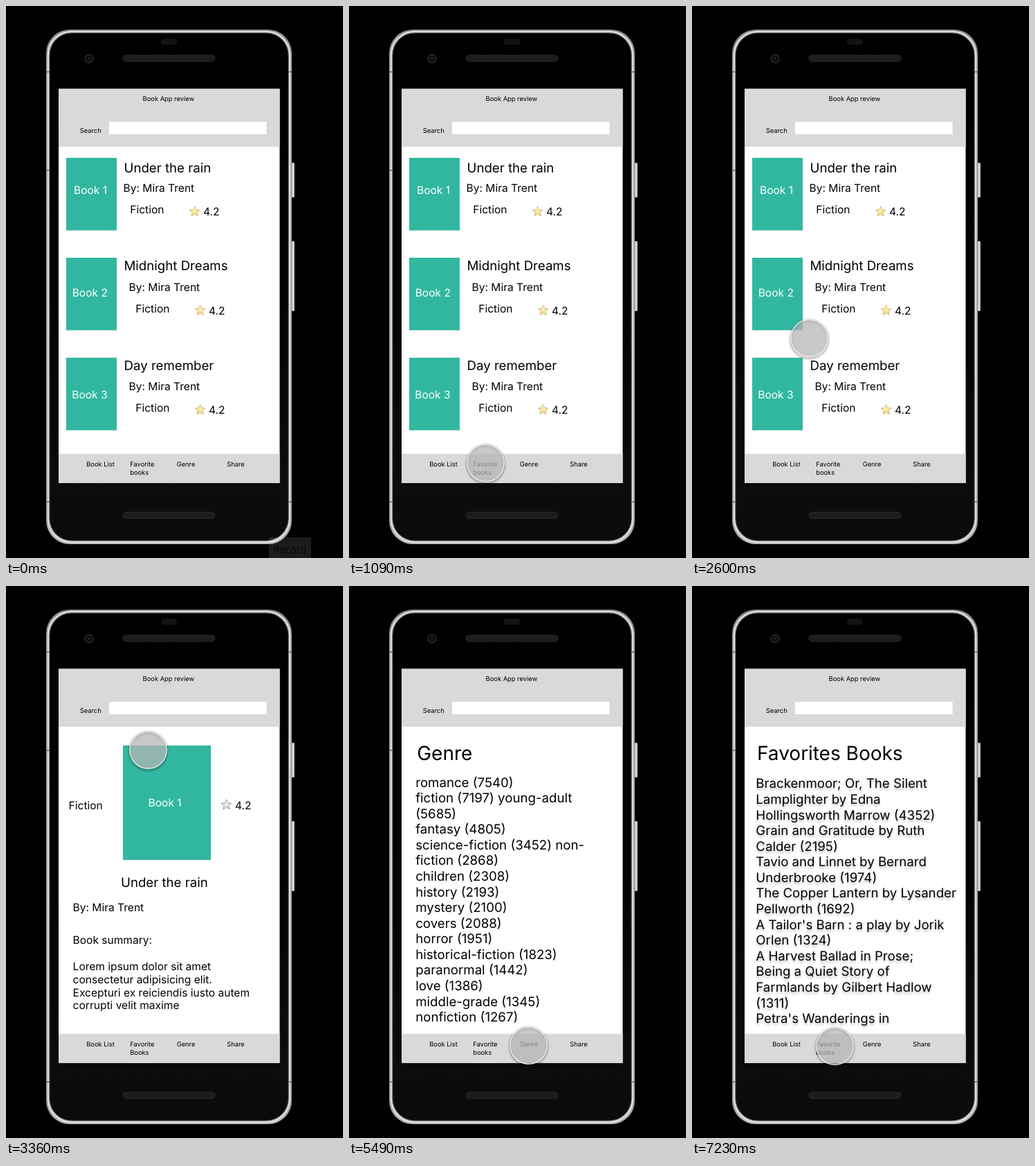
These frames come from a looping animation (487x796 px, 8000 ms). An HTML page:

```html
<!DOCTYPE html>
<html lang="en">
<head>
<meta charset="utf-8">
<title>Book app prototype</title>
<style>
  html, body { margin: 0; width: 100%; height: 100%; overflow: hidden; background: #000; }
  svg { display: block; width: 100%; height: 100%; }
  text {
    font-family: Inter, sans-serif;
    font-variation-settings: "opsz" 14;
    text-rendering: geometricPrecision;
    white-space: pre;
  }
  .tip { font-family: "Open Sans", sans-serif; }
  .soft { filter: drop-shadow(0 3.1px 1.6px rgba(0, 0, 0, .25)); }
</style>
</head>
<body>
<svg id="stage" viewBox="0 0 487 796" xmlns="http://www.w3.org/2000/svg">
  <defs>
    <linearGradient id="rim" x1="0" y1="0" x2="0" y2="1">
      <stop offset="0" stop-color="#8c8c8c"/>
      <stop offset=".06" stop-color="#9a9a9a"/>
      <stop offset=".95" stop-color="#9a9a9a"/>
      <stop offset="1" stop-color="#b8b8b8"/>
    </linearGradient>
    <linearGradient id="body" x1="0" y1="0" x2="0" y2="1">
      <stop offset="0" stop-color="#000"/>
      <stop offset=".5" stop-color="#030303"/>
      <stop offset=".9" stop-color="#0c0c0c"/>
      <stop offset="1" stop-color="#0b0b0b"/>
    </linearGradient>
    <linearGradient id="gold" x1="0" y1="0" x2="0" y2="1">
      <stop offset="0" stop-color="#fffbe0"/>
      <stop offset="1" stop-color="#f3d877"/>
    </linearGradient>
    <linearGradient id="silver" x1="0" y1="0" x2="0" y2="1">
      <stop offset="0" stop-color="#fff"/>
      <stop offset="1" stop-color="#d4d4d4"/>
    </linearGradient>
    <filter id="blur" x="-30%" y="-30%" width="160%" height="160%">
      <feGaussianBlur stdDeviation="1.6"/>
    </filter>
  </defs>
</svg>
<script>
const stage = document.getElementById('stage');
const TEAL = '#31b7a0', GREY = '#d9d9d9';
const TINY = 9.33, MID = 15.55, BIG = 18.66, HEAD = 28;
const LEADING = 1.21;

function add(parent, tag, attrs = {}) {
  const el = document.createElementNS('http://www.w3.org/2000/svg', tag);
  for (const key in attrs) el.setAttribute(key, attrs[key]);
  parent.appendChild(el);
  return el;
}
const group = (attrs) => add(stage, 'g', attrs);
const box = (parent, x, y, width, height, fill, more) =>
  add(parent, 'rect', { x, y, width, height, fill, ...more });

function label(parent, str, x, y, size, fill = '#000', more) {
  const el = add(parent, 'text', { x, y, 'font-size': size, fill, ...more });
  el.textContent = str;
  return el;
}
function lines(parent, rows, x, y, size) {
  rows.forEach((row, i) => label(parent, row, x, y + i * size * LEADING, size));
}
function star(parent, x, y, fill, stroke) {
  const pts = [];
  for (let i = 0; i < 10; i++) {
    const r = i % 2 ? 3.5 : 7.8, a = i * Math.PI / 5;
    pts.push((x + r * Math.sin(a)).toFixed(2) + ',' + (y + .6 - r * Math.cos(a)).toFixed(2));
  }
  add(parent, 'polygon', {
    points: pts.join(' '), fill: `url(#${fill})`, stroke,
    'stroke-width': .9, 'stroke-linejoin': 'round'
  });
}

function drawPhone() {
  const g = group();
  for (const [y, h] of [[226, 50], [339, 101]]) {
    box(g, 411, y, 6, h, '#a8a8a8', { rx: 1 });
    box(g, 413.5, y + 1, 2.5, h - 2, '#d8d8d8');
  }
  box(g, 58, 34, 355, 742, 'url(#rim)', { rx: 34 });
  box(g, 61, 37, 349, 736, 'none', { rx: 33, stroke: '#dedede', 'stroke-width': 2.4 });
  box(g, 63, 39, 345, 732, 'url(#body)', { rx: 32, stroke: '#4a4a4a', 'stroke-width': 1 });
  for (const [x, y] of [[58, 94], [408, 94], [58, 236], [58, 714], [408, 714]]) {
    box(g, x, y, 5, 2, '#777');
  }
  for (const y of [71, 730]) {
    box(g, 169, y, 133, 9, '#1d1d1d', { rx: 4.5, stroke: '#2b2b2b', 'stroke-width': 1 });
  }
  box(g, 224, 47, 23, 9, '#131313', { rx: 4 });
  add(g, 'circle', { cx: 120, cy: 76, r: 7, fill: '#1d1d1d' });
  add(g, 'circle', { cx: 120, cy: 76, r: 4, fill: '#0a0a0a' });
  add(g, 'circle', { cx: 120, cy: 75.5, r: 1.6, fill: '#2c2c2c' });
}

function drawFrame() {
  const g = group();
  box(g, 76, 119.5, 319.5, 568.5, '#fff');
  box(g, 76, 119.5, 319.5, 83.5, GREY);
  box(g, 149, 167, 227.5, 18, '#fff');
  box(g, 76, 645.8, 319.5, 42.2, GREY);
  label(g, 'Book App review', 197.6, 137.4, TINY);
  label(g, 'Search', 106.7, 183, TINY);
  label(g, 'Book List', 116.2, 664.2, TINY);
  label(g, 'Favorite', 179.2, 664.2, TINY);
  label(g, 'Genre', 246.7, 664.2, TINY);
  label(g, 'Share', 319.2, 664.2, TINY);
  return label(g, 'books', 179.2, 675.5, TINY);
}

function drawList() {
  const g = group();
  // title, cover top, cover label x/y, title y, author y, genre y, detail x shift
  const rows = [
    ['Under the rain', 219, 98, 270.8, 240.4, 268.4, 299.4, 0],
    ['Midnight Dreams', 363, 95.7, 419.4, 381.3, 411, 442, 8],
    ['Day remember', 507.2, 95.3, 566.4, 525.3, 554, 585.2, 8]
  ];
  rows.forEach(([title, top, bx, by, ty, ay, gy, dx], i) => {
    box(g, 87, top, 73, 104.6, TEAL);
    label(g, 'Book ' + (i + 1), bx, by, MID, '#fff');
    label(g, title, 170.5, ty, BIG);
    label(g, 'By: Mira Trent', 169.6 + dx, ay, MID);
    label(g, 'Fiction', 179.3 + dx, gy, MID);
    star(g, 272.6 + dx, gy - 3.4, 'gold', '#cdb067');
    label(g, '4.2', 285 + dx, gy + 3, MID);
  });
  return g;
}

function drawDetail() {
  const g = group();
  box(g, 169, 230, 127, 165, TEAL);
  label(g, 'Book 1', 205.6, 318.3, MID, '#fff');
  label(g, 'Fiction', 90.6, 322, MID);
  star(g, 318.5, 315, 'silver', '#8f8f8f');
  label(g, '4.2', 331, 322.4, MID);
  label(g, 'Under the rain', 166, 433.6, BIG);
  label(g, 'By: Mira Trent', 96.6, 469.2, MID);
  lines(g, ['Book summary:', '', 'Lorem ipsum dolor sit amet', 'consectetur adipisicing elit.',
    'Excepturi ex reiciendis iusto autem', 'corrupti velit maxime'], 96.6, 516.4, MID);
  return g;
}

function drawGenre() {
  const g = group();
  label(g, 'Genre', 98.2, 251, HEAD);
  lines(g, ['romance (7540)', 'fiction (7197) young-adult', '(5685)', 'fantasy (4805)',
    'science-fiction (3452) non-', 'fiction (2868)', 'children (2308)', 'history (2193)',
    'mystery (2100)', 'covers (2088)', 'horror (1951)', 'historical-fiction (1823)',
    'paranormal (1442)', 'love (1386)', 'middle-grade (1345)', 'nonfiction (1267)'],
    96.2, 289.5, BIG);
  return g;
}

function drawFavorites() {
  const g = group();
  label(g, 'Favorites Books', 94, 251, HEAD);
  const list = add(g, 'g', { class: 'soft' });
  lines(list, ['Brackenmoor; Or, The Silent', 'Lamplighter by Edna',
    'Hollingsworth Marrow (4352)', 'Grain and Gratitude by Ruth', 'Calder (2195)',
    'Tavio and Linnet by Bernard', 'Underbrooke (1974)', 'The Copper Lantern by Lysander',
    'Pellworth (1692)', "A Tailor's Barn : a play by Jorik", 'Orlen (1324)',
    'A Harvest Ballad in Prose;', 'Being a Quiet Story of', 'Farmlands by Gilbert Hadlow',
    '(1311)', "Petra's Wanderings in"], 92.3, 291.4, BIG);
  return g;
}

function drawTip() {
  const g = group();
  box(g, 380, 766, 61, 30, '#fff', { opacity: .11 });
  label(g, 'Record', 386.5, 789, 14.6, '#000', { class: 'tip', opacity: .8 });
  return g;
}

function drawCursor() {
  const g = group();
  // ring-shaped shadow, so the translucent disc stays clean
  add(g, 'circle', { cy: 2, r: 27, fill: 'none', stroke: '#000', 'stroke-opacity': .34,
    'stroke-width': 2.4, filter: 'url(#blur)' });
  add(g, 'circle', { r: 26.7, fill: '#b5b5b5', 'fill-opacity': .74 });
  add(g, 'circle', { r: 27.5, fill: 'none', stroke: '#808080', 'stroke-opacity': .6, 'stroke-width': .7 });
  add(g, 'circle', { r: 26.7, fill: 'none', stroke: '#fff', 'stroke-width': 1.1 });
  return g;
}

drawPhone();
const navWord = drawFrame();
const pages = [drawList(), drawDetail(), drawGenre(), drawFavorites()];
const tip = drawTip();
const cursor = drawCursor();

const LOOP = 8000, STEP = 70;
const pageTimes = [0, 3290, 5350, 7100];
const runs = [460, 2180, 3770, 4870, 5890];
// time, x, y
const path = [
  [460, 399, 800], [600, 360, 757], [740, 285, 690], [880, 228, 647], [950, 214, 644],
  [1090, 197.5, 659], [1230, 185.5, 659.5], [1650, 141, 659],
  [2110, 141, 659], [2250, 146, 640], [2600, 169.5, 479], [2880, 196, 275],
  [2950, 199.5, 249], [3300, 205.5, 236.5],
  [3700, 205.5, 236.5], [3910, 222, 320], [4120, 240, 480], [4330, 215, 625], [4470, 200, 656],
  [4800, 200, 656], [5280, 259.5, 662.5],
  [5820, 259.5, 662.5], [6310, 206.5, 663.5]
];

// The cursor moves in whole steps counted from the start of each run.
function snap(t) {
  const start = runs.filter(s => s <= t).pop();
  return start + Math.floor((t - start) / STEP) * STEP;
}
function pointAt(t) {
  const i = path.findIndex(k => k[0] > t);
  if (i < 0) return path[path.length - 1].slice(1);
  const a = path[i - 1], b = path[i], p = (t - a[0]) / (b[0] - a[0]);
  return [a[1] + (b[1] - a[1]) * p, a[2] + (b[2] - a[2]) * p];
}
function show(el, on) { el.style.display = on ? '' : 'none'; }

function draw() {
  const t = performance.now() % LOOP;
  const page = pageTimes.filter(s => s <= t).length - 1;
  pages.forEach((g, i) => show(g, i === page));
  navWord.textContent = page === 1 ? 'Books' : 'books';
  show(tip, t < 70);
  show(cursor, t >= runs[0]);
  if (t >= runs[0]) cursor.setAttribute('transform', `translate(${pointAt(snap(t)).join(' ')})`);
  requestAnimationFrame(draw);
}
draw();
</script>
</body>
</html>
```
